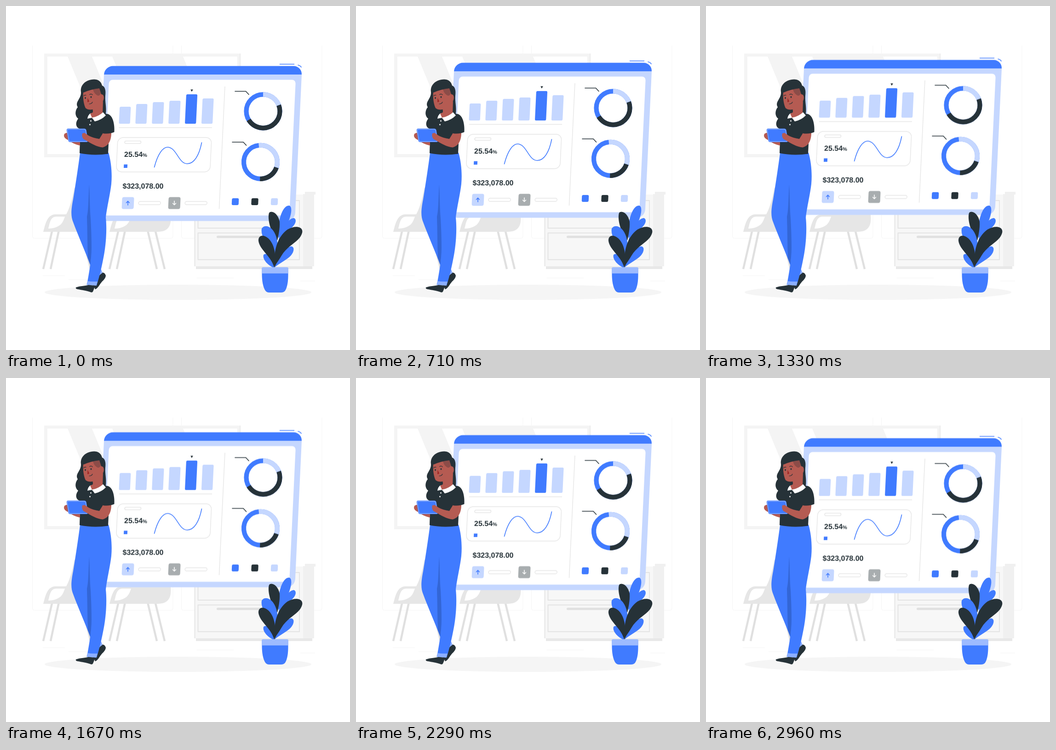
An HTML page that plays this animation: 748 by 748 pixels, repeating every 3000 ms.

```html
<!DOCTYPE html>
<html lang="en">
<head>
<meta charset="utf-8">
<title>Dashboard</title>
<style>
  html, body { margin: 0; width: 100%; height: 100%; overflow: hidden; background: #fff; }
  svg { display: block; width: 100%; height: 100%; }
  text { font: bold 16px "Liberation Sans", Arial, sans-serif; fill: #263238; text-rendering: geometricPrecision; }
  .small { font-size: 11px; }
  .blue { fill: #407bff; }
  .pale { fill: #c5d7ff; }
  .dark { fill: #263238; }
  .skin { fill: #b55b52; }
  .white { fill: #fff; }
  .line { fill: none; stroke: #e6e6e6; stroke-width: 1.4; }
  .stroke { fill: none; stroke: #407bff; stroke-width: 1.6; stroke-linecap: round; }
  .ink { stroke: #263238; }
  .ring circle { fill: none; stroke-width: 10.2; }
  #panel { animation: drift 3s -40ms linear infinite; }
  @keyframes drift {
    0%, 100% { transform: translateY(.4px); }
    50% { transform: translateY(-14.56px); }
  }
</style>
</head>
<body>
<svg viewBox="0 0 748 748">
  <defs>
    <g id="chair">
      <path fill="none" stroke="#e0e0e0" stroke-width="4.5" d="M100 490L81 572M114.500 490L97 572M164.500 490L184 572M181 490L201 572"/>
      <path fill="#e6e6e6" d="M81 491C85 478 88 453 108 453H131C142 432 145 412 149 395H200L214 453C216 474 212 491 186 491ZM92 484C104 484 114 480 120 474C124 469 126 464 128 458H109C96 458 95 474 92 484Z" fill-rule="evenodd"/>
    </g>
  </defs>

  <!-- Room -->
  <g fill="none" stroke="#f5f5f5">
    <path d="M57.500 86V501q0 4 4 4H359q4 0 4-4V86"/>
    <path d="M381.500 86V501q0 4 4 4H683q4 0 4-4V86"/>
    <path d="M80 586.500H128M136 595H180M415 591.500H495M640 598H672"/>
  </g>
  <path fill="#f4f4f4" d="M83 103.500H510V329H83Z"/>
  <path fill="#e8e8e8" d="M508.500 103.500h1.500V329h-1.500Z"/>
  <path class="white" d="M90 110H503V322H90Z"/>
  <path fill="#f4f4f4" d="M134 110H187L275 322H222ZM231 110H385L473 322H319Z"/>
  <ellipse cx="374" cy="622.500" rx="290" ry="16.500" fill="#f5f5f5"/>
  <use href="#chair"/>
  <use href="#chair" x="144"/>
  <g>
    <path fill="#f0f0f0" d="M646 409H670V566H646ZM650 404H673V410H650Z"/>
    <path fill="#f7f7f7" d="M410 410H646V566H410Z"/>
    <path fill="#e8e8e8" d="M413 566H666V572H413Z"/>
    <path fill="none" stroke="#e3e3e3" stroke-width="1.800" d="M417.500 423H638V483H417.500ZM417.500 493.500H638V551.500H417.500ZM410.500 410V566"/>
    <rect x="458" y="499.500" width="110" height="5" rx="2.500" fill="#e0e0e0"/>
  </g>

  <!-- Floating dashboard -->
  <g id="panel">
    <path class="stroke" d="M595.500 126.500H626.500M635 128.500Q640 129.500 642 133"/>
    <g transform="matrix(1 0 -.047 1 7.520 0)">
      <path class="pale" d="M212.500 148H642.500V449.500a18 18 0 0 1-18 18H230.500a18 18 0 0 1-18-18Z"/>
      <path class="blue" d="M212.500 149a18.500 18.500 0 0 1 18.500-18.500H624a18.500 18.500 0 0 1 18.500 18.500Z"/>
      <rect class="white" x="224" y="160.500" width="406" height="295" rx="8"/>
      <path class="line" d="M476.700 175V441M250.500 264.500H453"/>
      <g class="pale">
        <rect x="250" y="219" width="24.200" height="37" rx="2.500"/>
        <rect x="285.800" y="213" width="24.200" height="43" rx="2.500"/>
        <rect x="321.700" y="209" width="24.200" height="47" rx="2.500"/>
        <rect x="357.600" y="206" width="24.200" height="50" rx="2.500"/>
        <rect class="blue" x="393.500" y="192" width="24.200" height="64" rx="2.500"/>
        <rect x="429.400" y="201" width="24.200" height="55" rx="2.500"/>
      </g>
      <path class="dark" d="M402.300 181.500h5.600l-2.800 5z"/>
      <rect class="line" x="249" y="286" width="204" height="74.700" rx="12"/>
      <rect class="line" x="264.500" y="293.500" width="35.500" height="5.500" rx="2.700"/>
      <rect class="blue" x="265" y="344.500" width="7.800" height="7.500"/>
      <rect class="pale" x="264.700" y="415.500" width="26" height="26" rx="4"/>
      <rect fill="#a8adaf" x="365.700" y="415.500" width="26" height="26" rx="4"/>
      <rect class="line" x="300.800" y="425" width="48" height="7" rx="3.500"/>
      <rect class="line" x="401.800" y="425" width="48" height="7" rx="3.500"/>
      <rect class="blue" x="503.500" y="418" width="15" height="15" rx="3"/>
      <rect class="dark" x="546" y="418" width="15" height="15" rx="3"/>
      <rect class="pale" x="588.500" y="418" width="15" height="15" rx="3"/>
    </g>
    <path class="stroke" d="M265 433V424.500M261.500 428L265 424.500L268.500 428"/>
    <path class="stroke" style="stroke:#fff" d="M366 424V432.500M362.500 429L366 432.500L369.500 429"/>
    <path class="stroke" d="M322.500 350.500C330 322 341 307 351 307C371 307 375 343 394 343C409 343 420 325 425.500 297"/>
    <path class="stroke ink" d="M498 185.500H521.500L528 192.500M492 296H516L522.500 303"/>
    <g class="ring" transform="translate(559 228.800) rotate(-90)">
      <circle r="36.500" stroke="#407bff"/>
      <circle r="36.500" stroke="#c5d7ff" pathLength="360" stroke-dasharray="69 291"/>
      <circle r="36.500" stroke="#263238" pathLength="360" stroke-dasharray="170 190" stroke-dashoffset="-69"/>
    </g>
    <g class="ring" transform="translate(553.500 339.300) rotate(-96)">
      <circle r="36.500" stroke="#407bff"/>
      <circle r="36.500" stroke="#c5d7ff" pathLength="360" stroke-dasharray="115 245"/>
      <circle r="36.500" stroke="#263238" pathLength="360" stroke-dasharray="73 287" stroke-dashoffset="-115"/>
    </g>
    <text x="257" y="328.300">25.54<tspan class="small">%</tspan></text>
    <text x="253.500" y="397.300">$323,078.00</text>
  </g>

  <!-- Woman -->
  <g>
    <path class="dark" d="M207 580Q214 578 217 586Q217 592 209 599C203 606 200 614 194 616L189 606Z"/>
    <path fill="#8cafff" d="M190 572L207 573L210 580L200 588L190 594Z"/>
    <path class="blue" d="M161 320C157 350 151 390 146 420C141 445 141 458 146 470C157 500 173 535 185 568L205 575L200 470L195 330Z"/>
    <path fill="#3366d6" d="M181 388C179 415 180 440 176 458C177 490 177 520 178 548L185 568L192 560L190 440Z"/>
    <path class="blue" d="M161 319H223C229 340 231 365 229 387C226 412 219 440 217 460C220 488 217 525 211 552C207 573 202 592 197 608L176 606C180 582 186 553 186 525C186 500 185 480 184 462C182 440 182 412 181 388L175 350Z"/>
    <path fill="#8cafff" d="M177 598Q187 600 199 599L196.500 608L175 606.500Z"/>
    <path class="dark" d="M152 612C162 608 174 609 179 606.500L193 608Q192 615 189 621Q187 624 182 621.500C171 618 161 617 154 615.500Q151 614 152 612Z"/>

    <path class="dark" d="M163 187C161 173 172 160 192 159.500C205 160 208 169 209 173C217 176 217 187 216 195C215 209 219 220 217 234L180 240C178 256 174 268 163 268C151 265 150 254 157 245C149 239 150 227 156 220C149 208 164 202 163 187Z"/>
    <path class="skin" d="M188 214L211 207L210 236L190 246L181 237L189 231Z"/>
    <path class="skin" d="M168 188C167 200 169 214 173 222C180 228 194 226 203 218L210 208C215 201 213 191 207 192L205 178L171 181Z"/>
    <path fill="#8b4c48" d="M189 181L205 177Q208 183 206 190Q203 197 198 194Q191 190 189 181Z"/>
    <path class="dark" d="M164 188Q166 171 185 167Q204 167 209 179L207 191L203 179Q185 181 169 188Z"/>
    <path fill="#a02724" d="M177.500 200L177 209Q180 209.500 181 207Z"/>
    <ellipse class="dark" cx="172.500" cy="200" rx="1.400" ry="2"/>
    <ellipse class="dark" cx="185" cy="198" rx="1.400" ry="2"/>
    <path fill="none" stroke="#263238" stroke-width="1.200" stroke-linecap="round" d="M169 195.500Q171 193 174 194M182 192.500Q185 190 188 193M181 213Q186 213 188 209"/>
    <path class="dark" d="M177 237C171 248 164 268 161 285L160 320Q190 326 222 321.500L224 278L235.500 274C236.500 258 233 239 222 235L210 233L192 247Z"/>
    <path class="white" d="M184 233Q178 237 177 245L187 243L193 251Q207 248 217 238L211 231Q201 240 190 242Z"/>
    <path class="skin" d="M183 234L190 231L205 233Q198 239 187 243Z"/>
    <circle class="white" cx="184.500" cy="250" r="1.400"/>
    <circle class="white" cx="182.500" cy="258" r="1.400"/>

    <path class="skin" d="M127 278Q132 274 138 277L144 291L161 295V303.500C151 301 143 298 137 292Q125 288 126 281Z"/>
    <rect class="blue" x="-21.500" y="-14.700" width="43" height="29.500" rx="4" transform="matrix(1 0 .160 1 155 281.300)"/>
    <rect fill="none" stroke="#9dbbff" x="-20" y="-13.200" width="40" height="26.500" rx="3" transform="matrix(1 0 .160 1 155 281.300)"/>
    <path class="skin" d="M211 276L229 275.500C229 291 224 304 210 307.500C197 306 185 299 177 294L168 289Q164 283 166 277L171 276L180 282Q189 287 203 289Z"/>
    <path class="dark" d="M208 250L211 277Q224 279 235 274L231 247Z"/>
  </g>

  <!-- Plant -->
  <g class="blue">
    <path d="M592 505C589 473 600 432 616 434C626 437 619 472 592 505Z"/>
    <path d="M592 515C594 491 612 462 626 461C634 464 630 479 612 488Z"/>
    <path class="dark" d="M590 510C575 491 568 463 572 450C578 443 592 452 595 469C596 485 592 500 590 510Z"/>
    <path d="M585 560C577 530 552 503 556 484C562 474 580 477 588 503C594 525 590 545 585 560Z"/>
    <path d="M583 569C588 550 602 529 619 522.500C629 522 627 537 616 546C606 554 594 560 583 569Z"/>
    <path d="M584 570C570 565 557 551 560 541C566 535 582 545 584 570Z"/>
    <path class="dark" d="M583 569C578 545 552 531 549 511C548 498 561 495 573 508C585 522 588 545 583 569Z"/>
    <path class="dark" d="M584 569C581 532 590 502 612 486C631 475 647 481 644 493C639 513 614 518 599 543C593 554 587 559 584 569Z"/>
    <path d="M556.500 579C556 597 559 612 564 619Q567 623 572 623H598Q604 623 607 619C612 611 614 597 613.500 579Z"/>
    <path fill="#9dbbff" style="fill:#9dbbff" d="M559 568H611Q614 568 614 571V581.500H556V571Q556 568 559 568Z"/>
  </g>
</svg>
</body>
</html>
```
